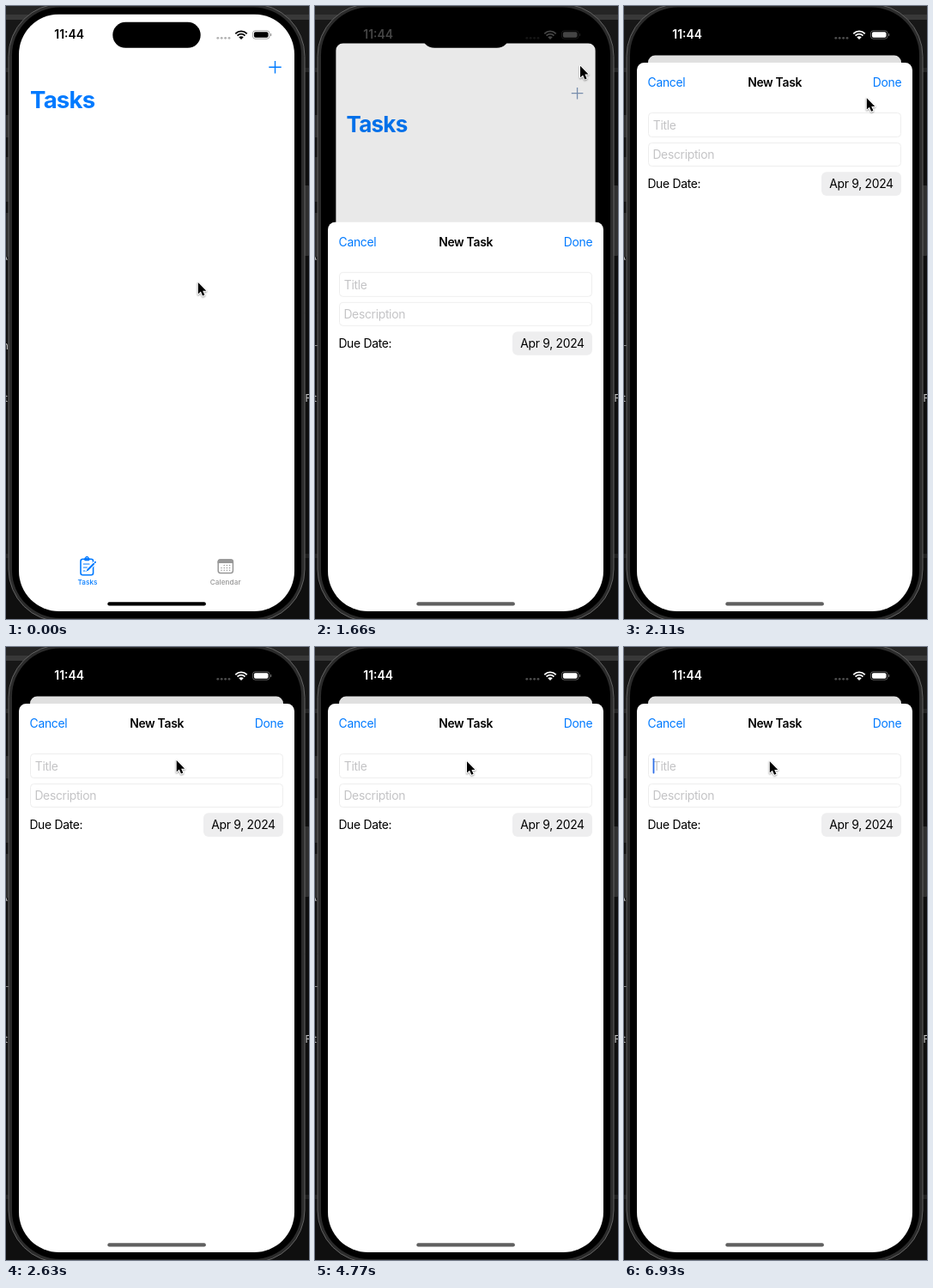
Animation, 353 px wide and 714 px high, one loop 8000 ms. Source, as an HTML page with a canvas:

```html
<!DOCTYPE html>
<html lang="en">
<head>
<meta charset="utf-8">
<title>New Task</title>
<style>
html, body { margin: 0; width: 100%; height: 100%; overflow: hidden; background: #0f0f0f; }
canvas { display: block; width: 353px; height: 714px; }
</style>
</head>
<body>
<canvas id="stage"></canvas>
<script>
const W = 353, H = 714, LOOP = 8000;
const BLUE = '#007aff';
const canvas = document.getElementById('stage');
const c = canvas.getContext('2d');
const dpr = window.devicePixelRatio || 1;
canvas.width = W * dpr;
canvas.height = H * dpr;

const clamp = v => Math.max(0, Math.min(1, v));
const mix = (a, b, k) => a + (b - a) * k;
const smooth = k => k * k * (3 - 2 * k);
const easeOut = k => 1 - (1 - k) ** 1.6;

// Share of n even steps done; the first falls on a, the last on b.
function stepped(t, a, b, n) {
  if (t < a) return 0;
  if (n === 1 || t >= b) return 1;
  return (Math.floor((t - a) / (b - a) * (n - 1) + 1e-6) + 1) / n;
}

function box(x, y, w, h, r, fill, stroke, line = 1) {
  c.beginPath();
  c.roundRect(x, y, w, h, r);
  if (fill) { c.fillStyle = fill; c.fill(); }
  if (stroke) { c.strokeStyle = stroke; c.lineWidth = line; c.stroke(); }
}

function text(str, x, y, size, color, weight = 400, align = 'left', track = -0.022) {
  c.font = `${weight} ${size}px Inter, "Liberation Sans", sans-serif`;
  c.letterSpacing = `${track * size}px`;
  c.textAlign = align;
  c.fillStyle = color;
  c.fillText(str, x, y);
}

function line(color, width, ...pts) {
  c.strokeStyle = color;
  c.lineWidth = width;
  c.beginPath();
  for (let i = 0; i < pts.length; i += 4) {
    c.moveTo(pts[i], pts[i + 1]);
    c.lineTo(pts[i + 2], pts[i + 3]);
  }
  c.stroke();
}

function dot(x, y, r, color) {
  c.fillStyle = color;
  c.beginPath();
  c.arc(x, y, r, 0, Math.PI * 2);
  c.fill();
}

// Sheet progress, held between redraws.
const marks = [1290, 1364, 1438, 1512, 1586, 1660, 1780, 1930, 2110];

function redrawTime(t) {
  return marks.reduce((last, m) => t >= m ? m : last, 0);
}

function spring(t) {
  if (t >= 2110) return 1;
  const k = Math.max(0, t - 1453) * 0.012;
  return 1 - (1 + k) * Math.exp(-k);
}

// start, end, steps, x, y, easing
const legs = [
  [120, 880, 14, 309, 69.8, smooth],
  [2110, 2110, 1, 282.8, 107.2, smooth],
  [2230, 2630, 8, 198.7, 132, easeOut],
  [3890, 3890, 1, 196.8, 132, smooth],
  [3940, 4060, 3, 186.7, 132, smooth],
  [4660, 4770, 3, 177, 133.2, smooth],
  [5550, 5670, 3, 179, 134.5, smooth],
  [6640, 6930, 5, 169.8, 133.2, smooth]
];

function pointer(t) {
  let x = 223.8, y = 322;
  for (const [a, b, n, tx, ty, ease] of legs) {
    const k = ease(stepped(t, a, b, n));
    x = mix(x, tx, k);
    y = mix(y, ty, k);
  }
  return [x, y];
}

function drawPointer(x, y) {
  c.save();
  c.translate(x, y);
  const p = new Path2D('M0 0V13.4L3.1 10.6L5.3 15.6L7.6 14.6L5.4 9.7H9.5Z');
  c.lineJoin = 'round';
  c.shadowColor = 'rgba(0,0,0,.4)';
  c.shadowBlur = 2 * dpr;
  c.shadowOffsetY = dpr;
  c.strokeStyle = '#fff';
  c.lineWidth = 2;
  c.stroke(p);
  c.shadowColor = 'transparent';
  c.fillStyle = '#000';
  c.fill(p);
  c.restore();
}

function drawDesk(t) {
  c.fillStyle = '#0f0f0f';
  c.fillRect(0, 0, W, H);
  const band = (y, h, color) => { c.fillStyle = color; c.fillRect(0, y, W, h); };
  band(0, 10, '#252525');
  band(10, 6, '#383838');
  band(16, 56, '#171717');
  band(72, 5, '#252525');
  band(638, 5, '#202020');
  text('A', -6.3, 296, 12, '#c8c8c8');
  if (t < 930) text('h', -4.2, 400, 12, '#c8c8c8');
  else line('#8a8a8a', 1, 0, 395.5, 3, 395.5);
  text('t', -2, 461, 12, '#c8c8c8');
  text('R', 348.5, 461, 12, '#c8c8c8');
  for (const [y, h] of [[127, 26], [176, 52], [241, 51]]) box(-2, y, 6, h, 1, '#2c2c2c');
  box(347, 209, 6, 82, 1, '#303030');
}

function drawBody() {
  box(3, -2.5, 345, 719.5, 61, '#2b2b2b', '#626262');
  box(7, 1.5, 337, 711.5, 56, '#000');
}

function drawTabs() {
  c.lineCap = 'round';
  box(87, 644.3, 14.6, 18.4, 2.4, null, BLUE, 1.6);
  box(91.2, 642.6, 6.2, 3.6, 1.2, BLUE);
  dot(94.3, 642.6, 1.9, BLUE);
  dot(94.3, 642.6, 0.6, '#fff');
  line(BLUE, 1.2, 90.3, 650, 97, 650, 90.3, 654, 94.5, 654, 90.3, 658, 92, 658);
  line('#fff', 4, 95, 657, 103.5, 648.5);
  line(BLUE, 2, 95.2, 656.8, 102.2, 649.8, 103.8, 648, 104, 647.8);
  line(BLUE, 1, 93.8, 658.3, 95, 657);
  c.lineCap = 'butt';
  text('Tasks', 95, 674, 8.2, BLUE, 500, 'center', 0);

  const gray = '#979797';
  box(247.2, 645, 17.2, 15.4, 2.6, null, gray, 1.5);
  box(246.6, 644.3, 18.4, 4.6, [3, 3, 0, 0], gray);
  for (let i = 0; i < 11; i++) {
    const k = i + 1;
    dot(251 + (k % 4) * 3.2, 651.5 + Math.floor(k / 4) * 2.9, 0.75, gray);
  }
  text('Calendar', 255.7, 674, 8.2, gray, 500, 'center', 0.01);
}

function plusAlpha(t) {
  const down = 1 - 0.85 * stepped(t, 930, 990, 2);
  return mix(down, 1, stepped(t, 1290, 1438, 3));
}

function drawTasks(t, p) {
  const s = mix(1, 0.919, p);
  c.save();
  c.translate(175.5, mix(9.5, 57.5, p));
  c.scale(s, s);
  c.translate(-175.5, -9.5);
  c.beginPath();
  c.roundRect(15, 9.5, 321, 696, 9);
  c.clip();
  c.fillStyle = '#fff';
  c.fillRect(15, 9, 321, 697);
  text('Tasks', 28.1, 118.8, 27.6, BLUE, 700, 'left', -0.03);
  const k = clamp(p / 0.8);
  const tint = `rgb(${mix(0, 145, k)},${mix(122, 158, k)},${mix(255, 180, k)})`;
  c.globalAlpha = plusAlpha(t);
  line(tint, 1.4, 306.3, 71.2, 320.7, 71.2, 313.5, 64, 313.5, 78.4);
  c.globalAlpha = 1;
  drawTabs();
  c.fillStyle = `rgba(0,0,0,${0.122 * p})`;
  c.fillRect(15, 9, 321, 697);
  c.restore();
}

function drawSheet(t, p) {
  if (p <= 0) return;
  c.save();
  c.translate(0, mix(705.5, 66, p));
  box(15, 0, 321, 720, [8.5, 8.5, 0, 0], '#fff');
  text('Cancel', 27.6, 28, 13.9, BLUE);
  text('New Task', 175.6, 28, 13.9, '#000', 600, 'center');
  text('Done', 323.2, 28, 13.9, BLUE, 400, 'right');
  box(28.5, 58.5, 294, 28, 4, '#fff', '#eeeeee');
  box(28.5, 93.5, 294, 27, 4, '#fff', '#eeeeee');
  text('Title', 33.8, 78.1, 13.9, '#c4c4c6');
  text('Description', 33.4, 112.1, 13.9, '#c4c4c6');
  text('Due Date:', 27.4, 146.4, 13.9, '#000');
  box(230, 127.3, 93, 27.7, 6, '#eeeeef');
  text('Apr 9, 2024', 276.5, 146.4, 13.9, '#000', 400, 'center');
  if (t >= 6210) {
    c.globalAlpha = t < 6640 ? 0.5 : 1;
    box(33.6, 63.4, 1.8, 18, 0.9, '#2f6fe8');
    c.globalAlpha = 1;
  }
  c.restore();
}

function drawStatus(rt) {
  const v = Math.round(255 * clamp((rt - 1590) / 260));
  const ink = `rgb(${v},${v},${v})`;
  text('11:44', 73.6, 38.4, 13.9, ink, 600, 'center', 0);

  c.globalAlpha = 0.3;
  for (let i = 0; i < 4; i++) dot(246.8 + i * 4.4, 37.3, 1.4, ink);
  c.globalAlpha = 1;

  // Wi-Fi fan
  c.save();
  c.beginPath();
  c.moveTo(274, 39);
  c.lineTo(264, 29);
  c.lineTo(264, 22);
  c.lineTo(284, 22);
  c.lineTo(284, 29);
  c.closePath();
  c.clip();
  c.strokeStyle = ink;
  c.lineWidth = 1.9;
  for (const r of [9.2, 6]) {
    c.beginPath();
    c.arc(274, 38.6, r, Math.PI, Math.PI * 2);
    c.stroke();
  }
  dot(274, 38.6, 3.4, ink);
  c.restore();

  c.globalAlpha = 0.4;
  box(287.4, 28.8, 19.6, 9.4, 3, null, ink, 0.9);
  box(308, 31.9, 1.2, 3.2, 0.6, ink);
  c.globalAlpha = 1;
  box(288.9, 30.3, 16.6, 6.4, 1.8, ink);
}

function draw(t) {
  const rt = redrawTime(t);
  const p = spring(rt);
  c.setTransform(dpr, 0, 0, dpr, 0, 0);
  drawDesk(t);
  drawBody();

  c.save();
  c.beginPath();
  c.roundRect(15, 9.5, 321, 695.5, 47);
  c.clip();
  c.fillStyle = '#000';
  c.fillRect(15, 9, 321, 697);
  drawTasks(t, p);
  drawStatus(rt);
  box(124.3, 18.8, 102.4, 30, 15, '#000');
  drawSheet(t, p);
  const g = Math.round(96 * clamp(p / 0.6));
  box(118.3, 694.3, 114.6, 4.2, 2.1, `rgb(${g},${g},${g})`);
  c.restore();

  drawPointer(...pointer(t));
}

const begin = performance.now();
function tick() {
  draw((performance.now() - begin) % LOOP);
  requestAnimationFrame(tick);
}
tick();
</script>
</body>
</html>
```
